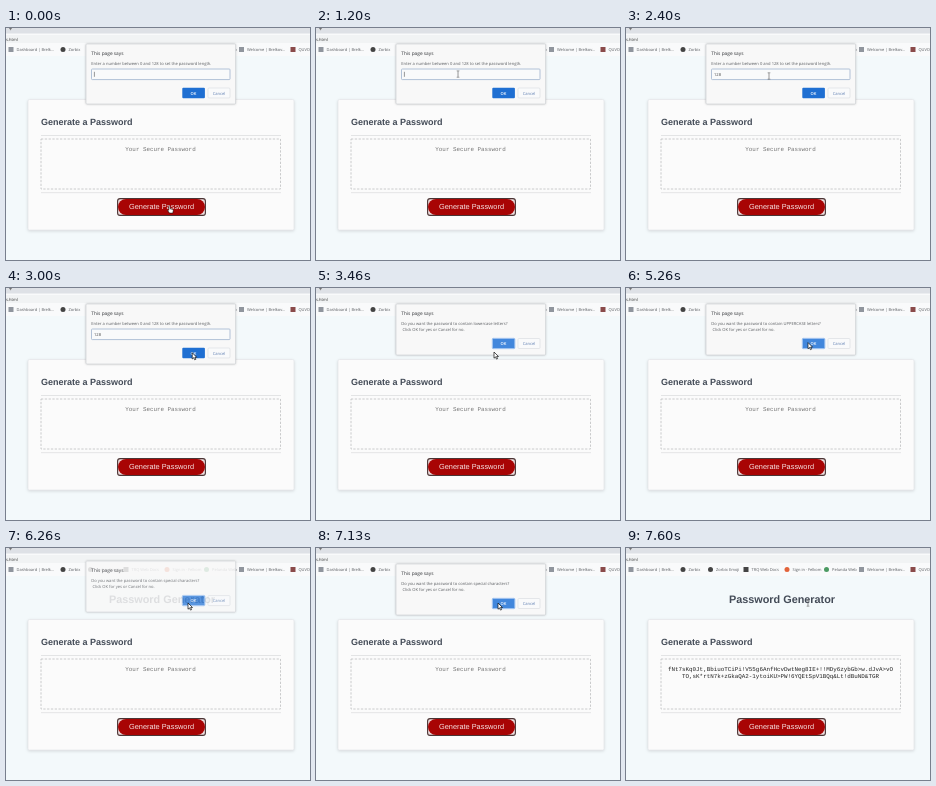
An HTML page that plays this animation: 304x232 px, repeating every 8 s.

```html
<!DOCTYPE html>
<html lang="en">
<head>
<meta charset="utf-8">
<title>Password Generator</title>
<style>
  html, body { margin: 0; width: 100%; height: 100%; overflow: hidden; background: #f3f9fb; }
  svg { display: block; width: 304px; height: 232px; text-rendering: geometricPrecision; }
  .ui { font-family: "Open Sans", "Noto Sans", sans-serif; font-size: 4.1px; fill: #5a5d61; }
  .page { font-family: "Liberation Sans", Arial, sans-serif; fill: #434b57; }
  .mono { font-family: "Liberation Mono", monospace; font-size: 5.87px; text-anchor: middle; }
  .mid { text-anchor: middle; }
  .card { filter: drop-shadow(0 1px 1.5px rgba(0, 0, 0, .12)); }
  .sheet { filter: drop-shadow(0 .6px 1px rgba(0, 0, 0, .2)); }
</style>
</head>
<body>
<svg viewBox="0 0 304 232">
  <rect width="304" height="232" fill="#f3f9fb"/>

  <!-- browser bars -->
  <rect width="304" height="28" fill="#f9fafb"/>
  <rect width="304" height="5.5" fill="#dee1e6"/>
  <path d="M3 .6h3M4.5 0v2.2" stroke="#666" stroke-width=".7"/>
  <rect y="7" width="304" height="8" fill="#f1f3f4"/>
  <g class="ui">
    <text x="0" y="12.6" fill="#333">s.html</text>
    <g id="marks" font-size="4"></g>
  </g>

  <!-- page -->
  <g class="page">
    <text class="mid" x="156" y="55" font-size="10.85" font-weight="700">Password Generator</text>
    <rect class="card" x="22" y="71.5" width="266" height="130.5" rx="1.5" fill="#fbfbfb" stroke="#e4e6e8" stroke-width=".7"/>
    <text x="35" y="97" font-size="9" font-weight="700">Generate a Password</text>
    <path d="M35 107.5H275M35 164.7H275" stroke="#dedfe0" stroke-width=".8"/>
    <rect x="35" y="111" width="239.5" height="50" fill="none" stroke="#c4c6c7" stroke-width=".9" stroke-dasharray="2.3 1.5"/>
    <text id="hint" class="mono" x="154.5" y="122.8" fill="#757575">Your Secure Password</text>
    <g id="secret" class="mono" fill="#222">
      <text x="154.5" y="122.8">fNt7sKq0Jt,BbiuoTCiPi!V55g6AnfHcvDwtNeg8IE+!!MDy6zybGb&gt;w.dJvA&gt;vO</text>
      <text x="154.5" y="129.8">TO,sK*rtN7k+zGkaQA2-1ytoiKU&gt;PW!6YQEtSpV1BQq&amp;Lt!dBuND&amp;TGR</text>
    </g>
    <rect x="111.6" y="170.6" width="87.8" height="16.8" rx="2.5" fill="#eedcdc" stroke="#4a3434" stroke-width="1.1"/>
    <rect x="112" y="171" width="87" height="16" rx="8" fill="#a80404"/>
    <text class="mid" x="155.5" y="181.2" font-size="7.36" style="fill:#f6e6e6">Generate Password</text>
  </g>

  <!-- dialog -->
  <g id="dialog" class="ui">
    <rect id="sheet" class="sheet" x="80" y="16" width="149.6" rx="1" fill="#f8f8f8" stroke="#cfd2d5" stroke-width=".7"/>
    <text x="85.3" y="27" font-size="4.8" fill="#303236">This page says</text>
    <text id="line1" x="85.3" y="36.6"></text>
    <text id="line2" x="86.5" y="43">Click OK for yes or Cancel for no.</text>
    <g id="field">
      <rect x="85.5" y="41" width="138.5" height="10.6" rx=".8" fill="#f9fafb" stroke="#a9bad3" stroke-width=".9"/>
      <text id="typed" x="88" y="47.8" fill="#444"></text>
      <path id="caret" d="M88.4 43.8v5" stroke="#555" stroke-width=".6"/>
    </g>
    <g id="buttons">
      <rect id="ok" x="176.3" y="50.3" width="22.6" height="10.4" rx="1"/>
      <text class="mid" x="187.4" y="57" font-weight="600" style="fill:#fff">OK</text>
      <rect x="202" y="50.5" width="22" height="10" rx="1" fill="#f9fafb" stroke="#dcdfe3" stroke-width=".7"/>
      <text class="mid" x="213" y="57" fill="#5f7fb2">Cancel</text>
    </g>
  </g>

  <!-- pointers, each drawn around its hot spot -->
  <g id="pointer">
    <path id="arrow" d="M0 0v6.2l1.5-1.3 1 2.2 1.1-.5-1-2.1h1.9z" fill="#fff" stroke="#111" stroke-width=".7"/>
    <path id="beam" d="M-1.3-3.2H-.3L0-2.9.3-3.2H1.3M0-2.9V2.9M-1.3 3.2H-.3L0 2.9.3 3.2H1.3" fill="none" stroke="#555" stroke-width=".6"/>
    <path id="hand" d="M-.7.6q.7-1.2 1.4 0v2.2l2.3.5q.9.2.8 1.2l-.5 2.6h-3.3l-1.9-2.6q.3-.8 1.2-.2z" fill="#fff" stroke="#111" stroke-width=".6"/>
  </g>
</svg>
<script>
const $ = id => document.getElementById(id);
const clamp = v => Math.min(1, Math.max(0, v));
const show = (id, on) => $(id).setAttribute("visibility", on ? "inherit" : "hidden");
const move = (id, x, y) => $(id).setAttribute("transform", `translate(${x} ${y})`);

// icon x, icon colour, round?, label
const bookmarks = [
  [5, "#90959d", 0, "Dashboard | Brelk..."],
  [57, "#444", 1, "Zorbix"],
  [84.5, "#444", 1, "Zorbix Emoji"],
  [120, "#444", 0, "TRQ Web Docs"],
  [161, "#e2633a", 1, "Sign in · Felkom"],
  [200.5, "#4b9a62", 1, "Pelunda Web"],
  [235.5, "#90959d", 0, "Welcome | Brelkov..."],
  [287, "#8a4a4a", 0, "QUVO"]
];
$("marks").innerHTML = bookmarks.map(([x, color, round, label]) =>
  `<rect x="${x - 2.5}" y="19" width="5" height="5" rx="${round ? 2.5 : 0}" fill="${color}"/>
   <text x="${x + 5.5}" y="22.9">${label}</text>`).join("");

const ask = what => `Do you want the password to contain ${what}?`;
// opens at, closes at, message
const dialogs = [
  [-500, 3060, "Enter a number between 0 and 128 to set the password length."],
  [3120, 4260, ask("lowercase letters")],
  [4320, 5270, ask("UPPERCASE letters")],
  [5330, 6130, ask("numbers")],
  [6190, 7150, ask("special characters")]
];

// time, x, y
const path = [
  [60, 163.5, 178], [500, 187, 66], [860, 152, 50], [1150, 142, 46],
  [1660, 143, 48], [2400, 143, 48], [2870, 187, 64], [3060, 186, 65],
  [3400, 178, 64], [3860, 178, 64], [4200, 182, 54], [6130, 182, 55]
];

function pointerAt(t) {
  const i = path.findIndex(p => p[0] > t);
  if (i < 1) return path[i ? path.length - 1 : 0].slice(1);
  const [a, b] = [path[i - 1], path[i]];
  const u = (t - a[0]) / (b[0] - a[0]), e = u * u * (3 - 2 * u);
  return [a[1] + (b[1] - a[1]) * e, a[2] + (b[2] - a[2]) * e];
}

function drawDialog(t) {
  const index = dialogs.findLastIndex(d => t >= d[0]);
  const [open, close, message] = dialogs[index];
  const prompt = index === 0;
  const eased = 1 - (1 - clamp((t - open) / 150)) ** 3;
  const opacity = eased * (1 - clamp((t - close) / 60));

  $("dialog").setAttribute("opacity", opacity);
  move("dialog", 0, -20 * (1 - eased));
  $("sheet").setAttribute("height", prompt ? 60 : 51);
  $("line1").textContent = message;
  show("line2", !prompt);
  show("field", prompt);
  move("buttons", 0, prompt ? 9.5 : 0);
  $("ok").setAttribute("fill", prompt ? "#1f6fd2" : "#4287dc");
  $("ok").setAttribute("stroke", prompt ? "none" : "#a9c9f2");

  const count = [2200, 2270, 2340].filter(key => t >= key).length;
  $("typed").textContent = "128".slice(0, count);
  move("caret", count * 2.35, 0);
  show("caret", prompt && t < 2340 && t % 1060 < 530);
  return { prompt, gone: opacity === 0 };
}

function drawPointer(t, { prompt, gone }) {
  const [x, y] = pointerAt(t);
  const inField = prompt && x > 85 && x < 224 && y > 41 && y < 52;
  const inText = y > 111 && y < 161;
  const shape = y > 171 ? "hand" : inField || inText || (gone && t > 7150) ? "beam" : "arrow";
  for (const id of ["arrow", "beam", "hand"]) show(id, id === shape);
  move("pointer", x, y);
}

function frame(now) {
  const t = now % 8000;
  drawPointer(t, drawDialog(t));
  show("hint", t < 7200);
  show("secret", t >= 7200);
  requestAnimationFrame(frame);
}
frame(0);
</script>
</body>
</html>
```
